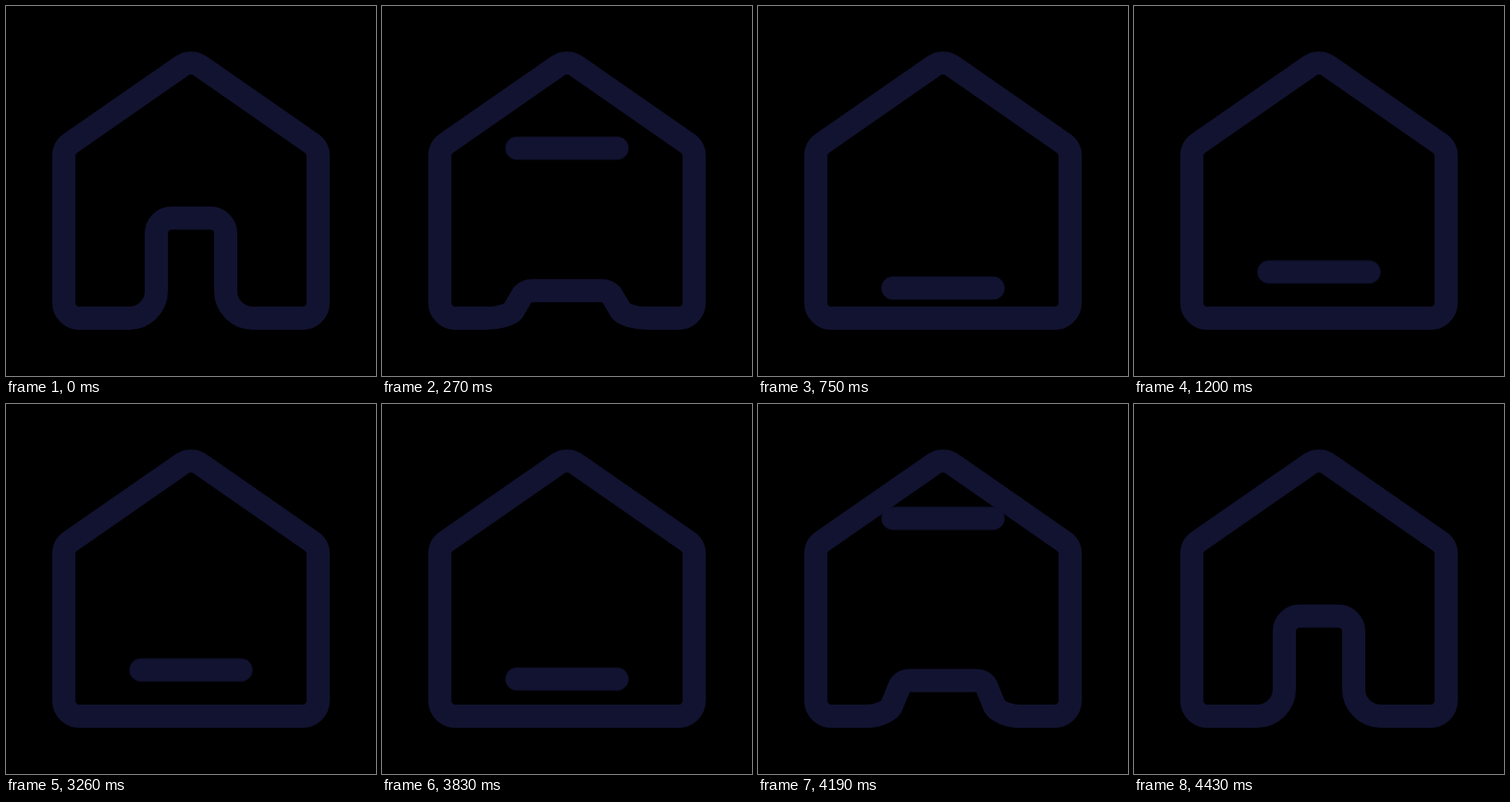
Animation of 400x400 px, one loop 5.46 s. Source, as an HTML page:

```html
<!DOCTYPE html>
<html lang="en">
<head>
<meta charset="utf-8">
<title>Home</title>
<style>
  html, body {
    margin: 0;
    width: 100%;
    height: 100%;
    overflow: hidden;
    background: #000;
  }
  svg {
    display: block;
    width: 100%;
    height: 100%;
  }
  path, line {
    fill: none;
    stroke: #121331;
    stroke-width: 25;
    stroke-linecap: round;
    stroke-linejoin: round;
  }

  #floor { animation: floor 5460ms infinite; }
  #bar { animation: bar 5460ms infinite; }

  /* Door opening <-> flat floor */
  @keyframes floor {
    0% {
      d: path("M79.2 337.5 L133.3 337.5 C149.4 337.5 162.5 324.4 162.5 308.3 L162.5 245.8 C162.5 236.6 170 229.2 179.2 229.2 L220.8 229.2 C230 229.2 237.5 236.6 237.5 245.8 L237.5 308.3 C237.5 324.4 250.6 337.5 266.7 337.5 L320.8 337.5");
      animation-timing-function: cubic-bezier(.314, 0, .2, 1);
    }
    11.209%, 69.927% {
      d: path("M79.2 337.5 L106 337.5 C118 337.5 128 337.5 134 337.5 L148 337.5 C151 337.5 152 337.5 156 337.5 L244 337.5 C248 337.5 249 337.5 252 337.5 L266 337.5 C272 337.5 282 337.5 294 337.5 L320.8 337.5");
      animation-timing-function: cubic-bezier(.8, 0, .686, 1);
    }
    81.136%, 100% {
      d: path("M79.2 337.5 L133.3 337.5 C149.4 337.5 162.5 324.4 162.5 308.3 L162.5 245.8 C162.5 236.6 170 229.2 179.2 229.2 L220.8 229.2 C230 229.2 237.5 236.6 237.5 245.8 L237.5 308.3 C237.5 324.4 250.6 337.5 266.7 337.5 L320.8 337.5");
    }
  }

  /* Drops in past its resting height, settles, dips and leaves upwards */
  @keyframes bar {
    0%, .256% {
      transform: translateY(55px);
      animation-timing-function: cubic-bezier(.48, 0, .2, 1);
    }
    13.956% {
      transform: translateY(305px);
      animation-timing-function: cubic-bezier(.5, 0, .2, 1);
    }
    21.978%, 59.158% {
      transform: translateY(287.5px);
      animation-timing-function: cubic-bezier(.8, 0, .5, 1);
    }
    67.179% {
      transform: translateY(305px);
      animation-timing-function: cubic-bezier(.8, 0, .52, 1);
    }
    80.879%, 100% {
      transform: translateY(55px);
    }
  }
</style>
</head>
<body>
<svg viewBox="0 0 400 400">
  <defs>
    <clipPath id="inside">
      <path d="M62.5 337.5 V153.4 L190.5 64.6 A16.67 16.67 0 0 1 209.5 64.6 L337.5 153.4 V337.5 Z"/>
    </clipPath>
  </defs>
  <path d="M79.2 337.5 A16.67 16.67 0 0 1 62.5 320.8 V162.1 A16.67 16.67 0 0 1 69.7 148.4 L190.5 64.6 A16.67 16.67 0 0 1 209.5 64.6 L330.3 148.4 A16.67 16.67 0 0 1 337.5 162.1 V320.8 A16.67 16.67 0 0 1 320.8 337.5"/>
  <path id="floor" d="M79.2 337.5 L133.3 337.5 C149.4 337.5 162.5 324.4 162.5 308.3 L162.5 245.8 C162.5 236.6 170 229.2 179.2 229.2 L220.8 229.2 C230 229.2 237.5 236.6 237.5 245.8 L237.5 308.3 C237.5 324.4 250.6 337.5 266.7 337.5 L320.8 337.5"/>
  <g clip-path="url(#inside)">
    <line id="bar" x1="145.83" y1="0" x2="254.17" y2="0"/>
  </g>
</svg>
</body>
</html>
```
